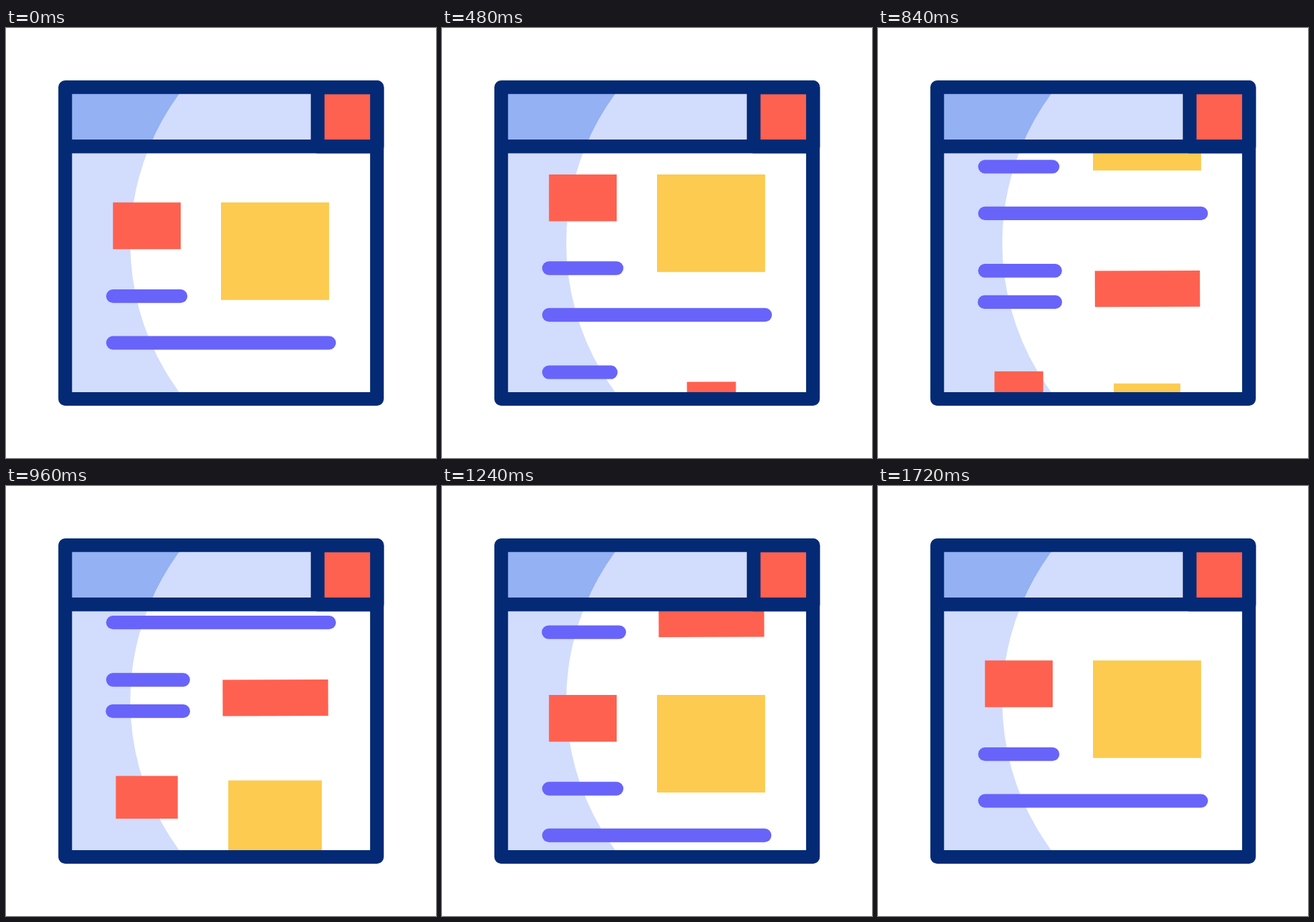
These frames come from a looping animation (640 px wide and 640 px high, 2 s). An HTML page:

```html
<!DOCTYPE html>
<html lang="en">
<head>
<meta charset="utf-8">
<title>Scrolling page</title>
<style>
  html, body { margin: 0; width: 100%; height: 100%; overflow: hidden; background: #fff; }
  svg { display: block; width: 100vw; height: 100vh; }
  .frame { fill: none; stroke: #042a75; stroke-width: 20.4; stroke-linejoin: round; }
  .line { stroke: #6864fa; stroke-width: 20.4; stroke-linecap: round; }
  .red { fill: #ff6150; }
  .yellow { fill: #fccb50; }
</style>
</head>
<body>
<svg viewBox="0 0 640 640">
  <defs>
    <clipPath id="view"><rect x="88" y="176" width="464" height="376"/></clipPath>
  </defs>
  <rect x="88" y="88" width="464" height="88" fill="#d2dcfd"/>
  <path d="M88 88H265.5A374 374 0 0 0 213.8 176H88Z" fill="#93b1f3"/>
  <path d="M88 176H213.8A374 374 0 0 0 265.5 552H88Z" fill="#d2dcfd"/>
  <g clip-path="url(#view)"><g id="page"></g></g>
  <rect class="red" x="464" y="88" width="88" height="88"/>
  <rect class="frame" x="88.1" y="88.1" width="464" height="464"/>
  <path class="frame" d="M88 176.3H552"/>
  <rect class="frame" x="463.9" y="88.2" width="88.4" height="88.2"/>
</svg>
<script>
const LOOP = 2000, STEP = 40, SCROLL = 434.4;
const page = document.getElementById('page');
const parts = [];

// Symmetric cubic-bezier(.58, 0, .42, 1)
function ease(x) {
  if (x <= 0) return 0;
  if (x >= 1) return 1;
  let lo = 0, hi = 1, s = 0.5;
  for (let i = 0; i < 30; i++) {
    s = (lo + hi) / 2;
    const r = 1 - s;
    const bx = 3 * s * r * r * 0.58 + 3 * s * s * r * 0.42 + s * s * s;
    if (bx < x) lo = s; else hi = s;
  }
  return s * s * (3 - 2 * s);
}

function add(tag, cls, attrs) {
  const el = document.createElementNS('http://www.w3.org/2000/svg', tag);
  el.setAttribute('class', cls);
  for (const key in attrs) el.setAttribute(key, attrs[key]);
  page.append(el);
  return el;
}

// Parts without a start time are always full size
function line(x1, x2, y, start, span = 800) {
  const el = add('line', 'line', { x1, x2, y1: y, y2: y });
  if (start === undefined) return;
  parts.push({ start, span, draw(k) {
    el.setAttribute('x2', x1 + (x2 - x1) * k);
    el.setAttribute('visibility', k > 0 ? 'inherit' : 'hidden');
  } });
}

function box(cls, x, y, width, height, start, tilt = 0) {
  const el = add('rect', cls, { x: -width / 2, y: -height / 2, width, height });
  const place = k => el.setAttribute('transform',
    `translate(${x + width / 2} ${y + height / 2}) rotate(${tilt}) scale(${k})`);
  place(1);
  if (start !== undefined) parts.push({ start, span: 800, draw: place });
}

function block(y, start) {
  const at = i => start === undefined ? undefined : start + i * 40;
  box('red', 159.2, y + 259.6, 100.8, 69.6, at(0));
  box('yellow', 320, y + 259.6, 160.9, 145.2, at(1));
  line(159.2, 259.8, y + 399.1, at(2));
  line(159.2, 480.9, y + 468.6, at(3));
}

block(0);
line(159.2, 263.6, 554, -256, 1032);
line(158.6, 263.8, 600.6, -37);
box('red', 322.5, 553.8, 157, 54, 92, -0.2);
block(SCROLL, 360);

function render(now) {
  const t = Math.floor((now % LOOP) / STEP) * STEP;
  page.setAttribute('transform', `translate(0 ${-SCROLL * ease((t - 40) / 1680)})`);
  for (const p of parts) p.draw(ease((t - p.start) / p.span));
}

const origin = performance.now();
function tick() {
  render(performance.now() - origin);
  requestAnimationFrame(tick);
}
tick();
</script>
</body>
</html>
```
